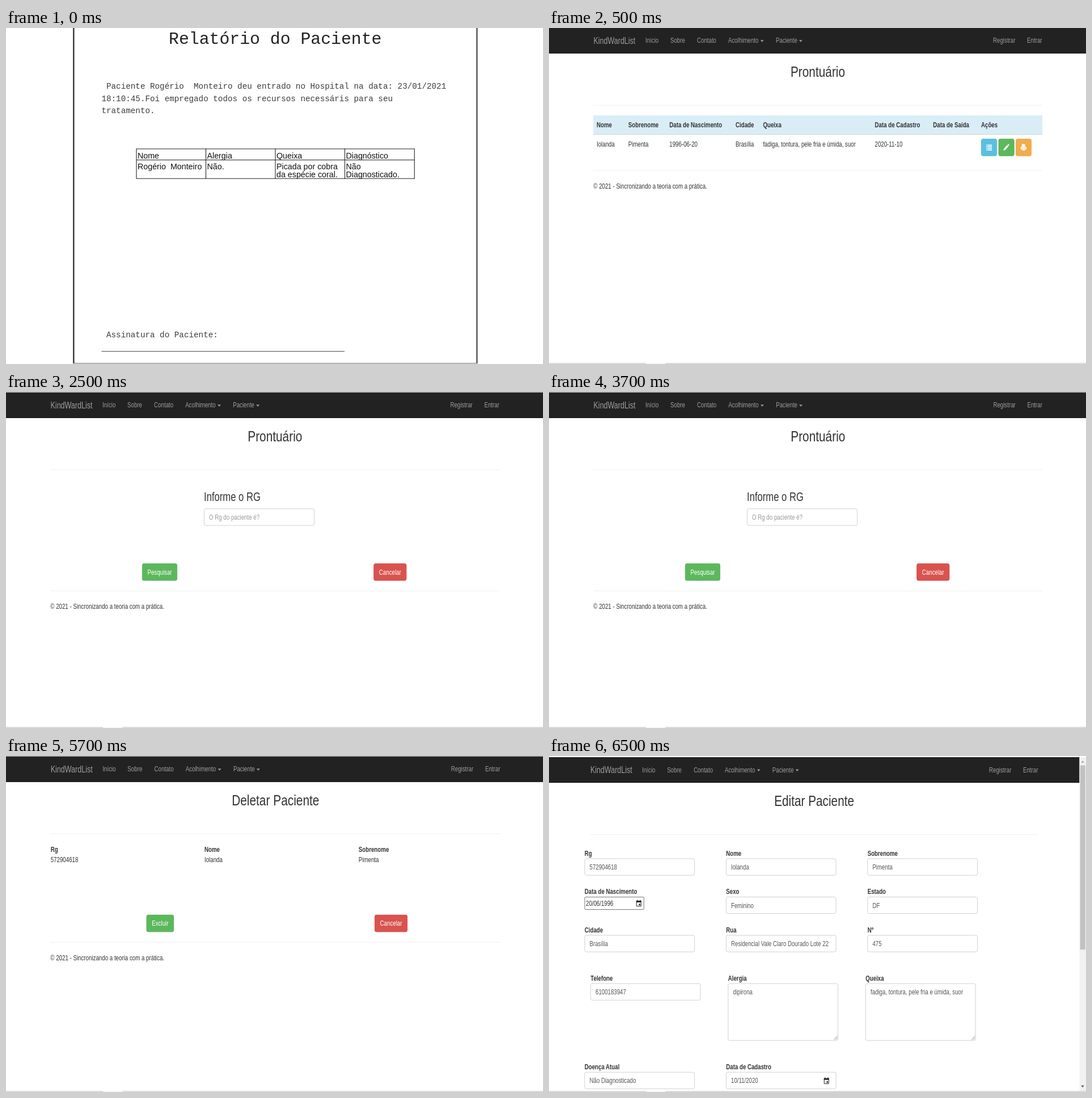
These frames come from a looping animation (947x592 px, 8 s). An HTML page:

```html
<!DOCTYPE html>
<html lang="pt-BR">
<head>
<meta charset="utf-8">
<title>Prontuário</title>
<style>
html, body { margin: 0; width: 100%; height: 100%; overflow: hidden; background: #fff; }
svg { display: block; width: 100vw; height: 100vh; font-family: "Liberation Sans", Arial, sans-serif; }
text { white-space: pre; }
.mono { font-family: "Liberation Mono", "Courier New", monospace; }
</style>
</head>
<body>
<svg id="stage" viewBox="0 0 947 592" preserveAspectRatio="none"></svg>
<script>
const LOOP = 8000;
const STARTS = [0, 500, 2500, 4500, 6500];
const SY = 0.885;

const PATIENT = { rg: '572904618', first: 'Iolanda', last: 'Pimenta', full: 'Rogério  Monteiro' };
const COMPLAINT = 'fadiga, tontura, pele fria e úmida, suor';

const BLUE = ['#5bc0de', '#46b8da'];
const GREEN = ['#5cb85c', '#4cae4c'];
const ORANGE = ['#f0ad4e', '#eea236'];
const RED = ['#d9534f', '#d43f3a'];

const rect = (x, y, w, h, fill, more = '') =>
  `<rect x="${x}" y="${y}" width="${w}" height="${h}" fill="${fill}" ${more}/>`;
const line = (x1, y1, x2, y2, color, w = 1) =>
  `<path d="M${x1} ${y1}L${x2} ${y2}" stroke="${color}" stroke-width="${w}"/>`;
const plain = (x, y, str, size, fill, cls = '') =>
  `<text x="${x}" y="${y}" font-size="${size}" fill="${fill}" class="${cls}">${str}</text>`;

// Web pages are laid out at 1366 px wide and squeezed as a whole.
function webPage({ sx, dx = 0, top, barTop, barRight = 947, title, titleX, edge }) {
  const text = (x, y, str, { size = 14, fill = '#333', bold = false, anchor = 'start' } = {}) =>
    `<text transform="matrix(${sx} 0 0 ${SY} ${x} ${y})" font-size="${size}" fill="${fill}"` +
    ` font-weight="${bold ? 700 : 400}" text-anchor="${anchor}">${str}</text>`;
  const bold = (x, y, str) => text(x, y, str, { bold: true });
  const frame = (x, y, w, h, fill, stroke) =>
    rect(x + .4, y + .4, w - .8, h - .8, fill, `rx="2.6" ry="3.2" stroke="${stroke}" stroke-width=".8"`);
  const button = (x, y, w, color, label = '') =>
    frame(x, y, w, 30.5, ...color) + text(x + w / 2, y + 19.6, label, { fill: '#fff', anchor: 'middle' });
  const field = (x, y, value, h = 30, w = 194.5, fill = '#555') =>
    frame(x, y, w, h, '#fff', '#c6c6c6') + text(x + 9, y + 19.5, value, { fill });
  const rule = y => line(78 + dx, y, 78 + dx + 1140 * sx, y, '#eee');
  const footer = y => text(78.3, y, '© 2021 - Sincronizando a teoria com a prática.');
  const calendar = (x, y) =>
    `<path d="M${x - 4} ${y - 4}h8v9h-8z" fill="none" stroke="#222"/>` +
    rect(x - 4.5, y - 4.5, 9, 2.8, '#222') +
    rect(x - 3.2, y - 6, 1.3, 2, '#222') + rect(x + 1.9, y - 6, 1.3, 2, '#222') +
    rect(x + .2, y + .7, 2.4, 2.8, '#222');

  const links = [['Início', 244.8], ['Sobre', 308], ['Contato', 375.8], ['Acolhimento', 455],
    ['Paciente', 576], ['Registrar', 1127.5], ['Entrar', 1214]];
  const at = X => dx + X * sx;
  const caret = X =>
    `<path d="M${at(X)} ${top + 21.2}h5.8l-2.9 3.5z" fill="#9d9d9d"/>`;

  const base = rect(0, 0, 947, 592, '#fff') +
    rect(0, barTop, barRight, top + 44.5 - barTop, '#222') +
    line(0, top + 44.3, barRight, top + 44.3, '#080808') +
    (edge ? rect(0, 0, 947, barTop, edge) : '') +
    text(at(113), top + 27.6, 'KindWardList', { size: 18, fill: '#9d9d9d' }) +
    links.map(([s, X]) => text(at(X), top + 26.4, s, { fill: '#9d9d9d' })).join('') +
    caret(537) + caret(635) +
    text(titleX, top + 85.7, title, { size: 30, anchor: 'middle' }) +
    rule(top + 136) +
    rect(0, 590, 947, 2, '#dcdcdc') + rect(171, 590, 34, 2, '#f7f7f7');

  return { base, text, bold, button, field, rule, footer, calendar, frame };
}

function report() {
  const ink = '#3c3c3c';
  const body = (x, y, s) => plain(x, y, s, 14.28, ink, 'mono');
  const cell = (x, y, s) => plain(x, y, s, 14.27, '#111');
  const cols = [230, 352.5, 475, 597.5, 720.3];
  const rows = [213, 232.5, 265.3];
  return rect(0, 0, 947, 592, '#fff') +
    line(119.3, 0, 119.3, 591, '#333', 2.4) + line(830.5, 0, 830.5, 591, '#333', 2) +
    line(118, 590.8, 831.5, 590.8, '#666', 1) +
    plain(287, 28, 'Relatório do Paciente', 29.8, '#222', 'mono') +
    body(168.4, 107, ` Paciente ${PATIENT.full} deu entrado no Hospital na data: 23/01/2021`) +
    body(168.4, 128.5, '18:10:45.Foi empregado todos os recursos necessáris para seu') +
    body(168.4, 150, 'tratamento.') +
    cols.map(x => line(x, rows[0] - .5, x, rows[2] + .5, '#222', 1.1)).join('') +
    rows.map(y => line(cols[0], y, cols[4], y, '#222', 1.1)).join('') +
    ['Nome', 'Alergia', 'Queixa', 'Diagnóstico'].map((s, i) => cell(cols[i] + 2, 230, s)).join('') +
    [PATIENT.full, 'Não.', 'Picada por cobra', 'Não'].map((s, i) => cell(cols[i] + 2, 248.7, s)).join('') +
    cell(477, 262.8, 'da espécie coral.') + cell(599.5, 262.8, 'Diagnosticado.') +
    body(168.4, 545, ' Assinatura do Paciente:') +
    line(168.5, 569.8, 597, 569.8, ink, 1);
}

function records() {
  const p = webPage({ sx: .6945, top: 0, barTop: 0, title: 'Prontuário', titleX: 474 });
  const columns = [
    [84, 'Nome', PATIENT.first], [139.8, 'Sobrenome', PATIENT.last],
    [212.3, 'Data de Nascimento', '1996-06-20'], [329, 'Cidade', 'Brasília'],
    [377.4, 'Queixa', COMPLAINT], [574.5, 'Data de Cadastro', '2020-11-10'],
    [677.3, 'Data de Saída', ''], [762, 'Ações', '']];
  const list = [0, 1, 2, 3].map(i =>
    rect(771, 205.6 + i * 2.8, 1.6, 1.7, '#fff') + rect(773.4, 205.6 + i * 2.8, 7.8, 1.7, '#fff')).join('');
  const pencil = '<path d="M801.4 216l.8-3.6 5.6-6.1 2.2 2.5-5.5 6.2zM808.5 205.5l1.3-1.4 2.1 2.4-1.3 1.5z" fill="#fff"/>';
  const printer = '<path d="M833.8 204.5h4.7l1.4 1.6v3h-6.1zM831.9 209.4h10v4.7h-2v-1.6h-6.1v1.6h-1.9zM834.4 213.2h5v2.8h-5z" fill="#fff"/>';
  return p.base +
    rect(78.3, 154, 791.7, 33.2, '#d9edf7') + rect(78.3, 186.8, 791.7, 1.5, '#d5dde0') +
    columns.map(([x, head, value]) => p.bold(x, 175.2, head) + p.text(x, 209.2, value)).join('') +
    p.button(762, 195.2, 28, BLUE) + p.button(792.6, 195.2, 28, GREEN) + p.button(823, 195.2, 28, ORANGE) +
    list + pencil + printer + p.rule(251) + p.footer(283.2);
}

function search() {
  const p = webPage({ sx: .6948, top: 1, barTop: 1, edge: '#b4b4b4', title: 'Prontuário', titleX: 474.3 });
  return p.base +
    p.text(349, 192, 'Informe o RG', { size: 24 }) +
    p.field(349, 205.3, 'O Rg do paciente é?', 30.3, 195, '#999') +
    p.button(240, 302, 62, GREEN, 'Pesquisar') + p.button(648.3, 302, 58, RED, 'Cancelar') +
    p.rule(350.3) + p.footer(382.4);
}

function removal() {
  const p = webPage({ sx: .696, top: 1, barTop: 1, edge: '#b4b4b4', title: 'Deletar Paciente', titleX: 475.3 });
  return p.base +
    [[78.7, 'Rg', PATIENT.rg], [350, 'Nome', PATIENT.first], [621.8, 'Sobrenome', PATIENT.last]]
      .map(([x, label, value]) => p.bold(x, 168.8, label) + p.text(x, 186.7, value)).join('') +
    p.button(247.6, 279.7, 48.5, GREEN, 'Excluir') + p.button(650, 279.7, 58, RED, 'Cancelar') +
    p.rule(328.3) + p.footer(360.2);
}

function editor() {
  const p = webPage({ sx: .693, dx: -5.3, top: 2.4, barTop: 2, barRight: 935.5,
    title: 'Editar Paciente', titleX: 467.6 });
  const entry = (x, y, label, value, h) => p.bold(x + .3, y - 4.6, label) + p.field(x, y, value, h);
  const grip = (x, y) =>
    line(x - 7, y - 1.5, x - 1.5, y - 8, '#777', .8) + line(x - 4, y - 1.5, x - 1.5, y - 4.6, '#777', .8);
  return p.base +
    entry(62.5, 180.5, 'Rg', PATIENT.rg) +
    entry(312, 180.5, 'Nome', PATIENT.first) +
    entry(561.4, 180.5, 'Sobrenome', PATIENT.last) +
    p.bold(62.8, 243.4, 'Data de Nascimento') +
    rect(63, 248.5, 104.3, 22, '#fff', 'rx="1.5" stroke="#777"') +
    p.text(65, 263.8, '20/06/1996') + p.calendar(158.3, 259.6) +
    entry(312, 248, 'Sexo', 'Feminino') +
    entry(561.4, 248, 'Estado', 'DF') +
    entry(62.5, 315.5, 'Cidade', 'Brasília') +
    entry(312, 315.5, 'Rua', 'Residencial Vale Claro Dourado Lote 22') +
    entry(561.4, 315.5, 'Nº', '475') +
    entry(73, 400.6, 'Telefone', '6100183947') +
    entry(315.5, 400.6, 'Alergia', 'dipirona', 101) + grip(510, 501.3) +
    entry(558, 400.6, 'Queixa', COMPLAINT, 101) + grip(752.5, 501.3) +
    entry(62.5, 556.8, 'Doença Atual', 'Não Diagnosticado') +
    entry(312, 556.8, 'Data de Cadastro', '10/11/2020') + p.calendar(489.3, 572.3) +
    rect(935.5, 2, 11.5, 588, '#f1f1f1') + rect(936.7, 16.5, 9, 324.5, '#c1c1c1') +
    '<path d="M938.3 11.7h5.4l-2.7-3.4z" fill="#a3a3a3"/>' +
    '<path d="M938.3 580.6h5.4l-2.7 3.4z" fill="#505050"/>';
}

const stage = document.getElementById('stage');
stage.innerHTML = [report, records, search, removal, editor].map(draw => `<g>${draw()}</g>`).join('');
const scenes = [...stage.children];

function show() {
  const t = performance.now() % LOOP;
  const now = STARTS.filter(s => s <= t).length - 1;
  scenes.forEach((g, i) => { g.style.display = i === now ? 'inline' : 'none'; });
  requestAnimationFrame(show);
}
show();
</script>
</body>
</html>
```
